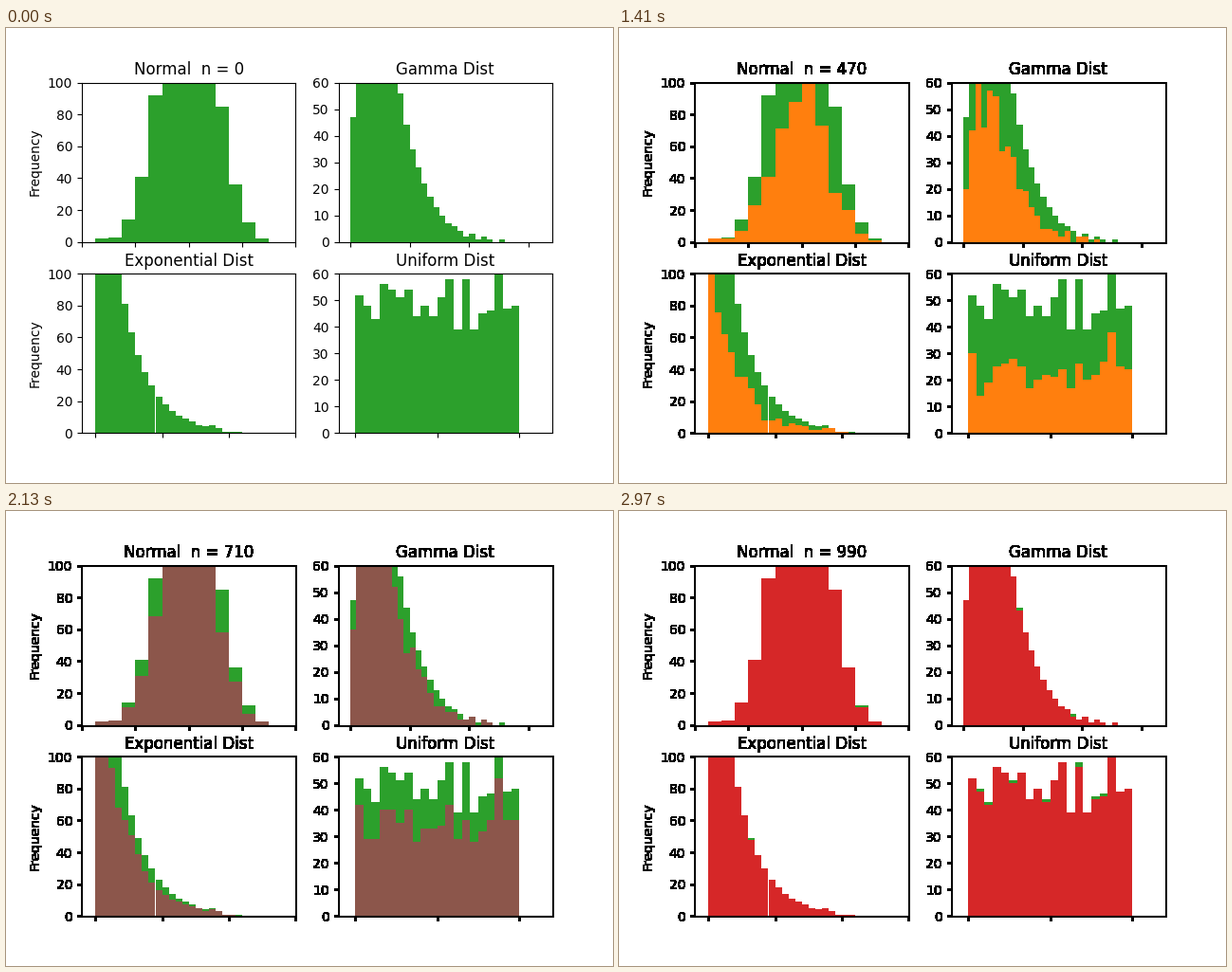
A matplotlib script that plays this animation: 640x480 px, repeating every 3000 ms.

```python
import numpy as np
import matplotlib.pyplot as plt
from matplotlib.animation import FuncAnimation

FRAMES, INTERVAL, STEP = 100, 30, 10
TOTAL = FRAMES * STEP
rng = np.random.default_rng(7)


def harden(img, dpi):
    """Make every touched pixel opaque, as when the alpha channel is dropped."""
    img = img.copy()
    img[..., 3] = img[..., 3] > 0
    return img, 0, 0


def normal_pdf(x, mu=-0.03, sd=0.95):
    return np.exp(-((x - mu) / sd) ** 2 / 2) / (sd * np.sqrt(2 * np.pi))


def gamma_pdf(x, scale=1.5):
    return x / scale ** 2 * np.exp(-x / scale)


def expo_pdf(x, scale=2):
    return np.exp(-x / scale) / scale


def bin_counts(pdf, bins):
    """Expected counts per bin, with chance hits in the thin tails."""
    width = bins[1] - bins[0]
    mean = TOTAL * width * pdf(bins[:-1] + width / 2)
    return np.where(mean < 4, rng.poisson(mean), np.round(mean)).astype(int)


class Panel:
    """A full histogram with a growing one, filled by samples in random order."""

    def __init__(self, ax, title, bins, counts, xlim, xticks, ytop, ystep):
        self.ax, self.size = ax, len(counts)
        self.order = rng.permutation(np.repeat(np.arange(self.size), counts))
        mids = (bins[:-1] + bins[1:]) / 2
        ax.hist(mids, bins=bins, weights=counts, color="C2")
        self.bars = ax.hist(mids, bins=bins, weights=0 * counts)[2]
        ax.set(title=title, xlim=xlim, ylim=(0, ytop), xticks=xticks,
               yticks=range(0, ytop + 1, ystep))
        ax.tick_params(labelbottom=False)

    def update(self, n, color, hard):
        seen = self.order[:round(n / TOTAL * len(self.order))]
        for bar, count in zip(self.bars, np.bincount(seen, minlength=self.size)):
            bar.set_height(count)
            bar.set_facecolor(color)
        self.ax.set_agg_filter(harden if hard else None)


fig, ((ax1, ax2), (ax3, ax4)) = plt.subplots(2, 2, figsize=(6.4, 4.8), dpi=100)

normal_bins = np.arange(-3.5, 3.6, 0.5)
gamma_bins = np.arange(0, 14.1, 0.5)
expo_bins = np.arange(0, 13.1, 0.5)
flat_counts = np.array([52, 48, 43, 56, 54, 51, 54, 44, 48, 44,
                        51, 58, 39, 58, 39, 45, 46, 75, 47, 48])

panels = [
    Panel(ax1, "Normal  n = 0", normal_bins, bin_counts(normal_pdf, normal_bins),
          (-4, 4), range(-4, 5, 2), 100, 20),
    Panel(ax2, "Gamma Dist", gamma_bins, bin_counts(gamma_pdf, gamma_bins),
          (-1, 17), range(0, 16, 5), 60, 10),
    Panel(ax3, "Exponential Dist", expo_bins, bin_counts(expo_pdf, expo_bins),
          (-1, 15), range(0, 16, 5), 100, 20),
    Panel(ax4, "Uniform Dist", np.linspace(0, 1, 21), flat_counts,
          (-0.1, 1.2), (0, 0.5, 1), 60, 10),
]
for ax in (ax1, ax3):
    ax.set_ylabel("Frequency", labelpad=4.8)


def update(i):
    n = i * STEP
    ax1.set_title(f"Normal  n = {n}")
    for panel in panels:
        panel.update(n, f"C{(i + 4) % 10}", hard=i > 0)


anim = FuncAnimation(fig, update, frames=FRAMES, interval=INTERVAL,
                     repeat=True, repeat_delay=0, blit=False)
plt.show()
```
